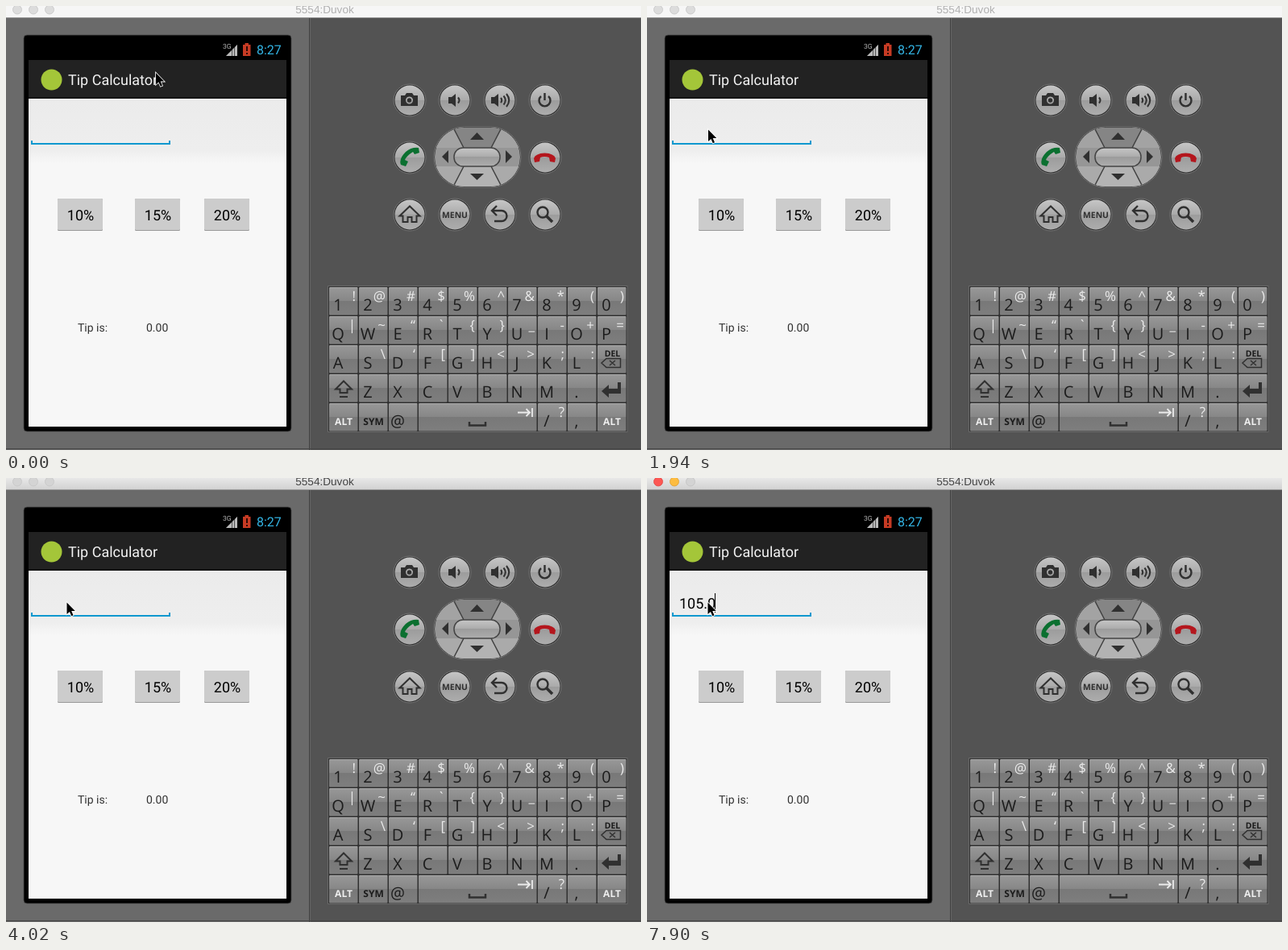
Recreate the animation shown at these times as an HTML page. Size 788 by 551 pixels, loop 8000 ms.

```html
<!DOCTYPE html>
<html lang="en">
<head>
<meta charset="utf-8">
<title>Tip Calculator</title>
<style>
  html, body { margin: 0; width: 100%; height: 100%; overflow: hidden; background: #535353; }
  svg { display: block; text-rendering: geometricPrecision; }
  text { white-space: pre; }
  .app { font-family: Roboto, sans-serif; font-size: 18px; }
  .key { font-family: "Open Sans", sans-serif; font-size: 20px; fill: #1c1c1c; text-anchor: middle; }
  .alt { font-size: 17px; fill: #ebebeb; text-anchor: end; }
  .cap { font-size: 12px; font-weight: 700; }
  .line { fill: none; stroke: #303030; stroke-width: 2.4; }
  .dark { fill: #303030; }
</style>
</head>
<body>
<svg width="788" height="551" viewBox="0 0 788 551">
  <defs>
    <linearGradient id="bar" x2="0" y2="1"><stop stop-color="#e8e8e8"/><stop offset="1" stop-color="#d2d2d2"/></linearGradient>
    <linearGradient id="page" x2="0" y2="1"><stop stop-color="#ebebeb"/><stop offset=".8" stop-color="#eeeeee"/><stop offset="1" stop-color="#f7f7f7"/></linearGradient>
    <linearGradient id="round" x2="0" y2="1"><stop stop-color="#c6c6c6"/><stop offset=".5" stop-color="#aaaaaa"/><stop offset=".5" stop-color="#9c9c9c"/><stop offset="1" stop-color="#adadad"/></linearGradient>
    <linearGradient id="cell" x2="0" y2="1"><stop stop-color="#989898"/><stop offset=".48" stop-color="#878787"/><stop offset=".48" stop-color="#787878"/><stop offset="1" stop-color="#7e7e7e"/></linearGradient>
    <clipPath id="padShape"><rect x="532" y="151" width="106" height="73" rx="36.5"/></clipPath>
  </defs>

  <!-- window -->
  <rect width="788" height="551" fill="#535353"/>
  <rect width="376" height="551" fill="#6a6a6a"/>
  <path d="M376.5 15V551" stroke="#3f3f3f"/>
  <path d="M377.5 15V551" stroke="#656565"/>
  <path d="M0 549.5H788" stroke="#454545"/>
  <rect id="titleBar" width="788" height="14"/>
  <path d="M0 14.5H788" stroke="#9b9b9b"/>
  <g id="lights"></g>
  <text id="title" x="395.5" y="9" text-anchor="middle" font-family="Liberation Sans, Arial, sans-serif" font-size="13.6">5554:Duvok</text>

  <!-- handset screen -->
  <rect x="22" y="36" width="332" height="492" rx="4" stroke="#4a4a4a" stroke-width=".8"/>
  <rect x="28" y="67" width="320" height="48" fill="#222"/>
  <path d="M28 114H348" stroke="#141414" stroke-width="2"/>
  <rect x="28" y="115" width="320" height="407" fill="#f7f7f7"/>
  <rect x="28" y="115" width="320" height="80" fill="url(#page)"/>
  <text class="app" x="269" y="53" fill="#b5b5b5" style="font-size:8.5px">3G</text>
  <path d="M273 62L287 48V62Z" fill="#555"/>
  <path d="M273 62L280 55V62ZM281 54L283 52V62H281ZM284 51L287 48V62H284Z" fill="#bbb"/>
  <path d="M296.500 46H301V48H303.500V62H294V48H296.500Z" fill="#c63b24"/>
  <path d="M298 50H300V56H298ZM298 58H300V60H298Z" fill="#300a06"/>
  <text class="app" x="311" y="60" fill="#33b5e5" style="font-size:16px">8:27</text>
  <circle cx="56.500" cy="91.500" r="13" fill="#a4c639"/>
  <text class="app" x="77" y="98" fill="#f3f3f3">Tip Calculator</text>
  <path d="M32 167V171H203V167" fill="none" stroke="#0f98cf" stroke-width="2"/>
  <g id="tips" class="app"></g>
  <text class="app" x="89" y="404" fill="#333" style="font-size:14px">Tip is:</text>
  <text class="app" x="174" y="404" fill="#333" style="font-size:14px">0.00</text>
  <text id="amount" class="app" x="40" y="162"></text>
  <rect id="caret" y="143" width="1" height="24"/>

  <!-- hardware buttons -->
  <g id="rounds"></g>
  <rect x="531" y="150" width="108" height="75" rx="37.500" fill="#2d2d2d" stroke="#777"/>
  <g clip-path="url(#padShape)">
    <rect x="532" y="151" width="106" height="73" fill="#969696"/>
    <path d="M532 151H638V176H532Z" fill="#a3a3a3"/>
    <path d="M532 199H638V224H532Z" fill="#aaa"/>
    <path d="M555 151H615L602 176H568Z" fill="#858585"/>
    <path d="M555 224H615L602 199H568Z" fill="#b3b3b3"/>
    <path d="M555 151L568 176M615 151L602 176M555 224L568 199M615 224L602 199" stroke="#404040" stroke-width="1.500"/>
  </g>
  <rect x="556" y="176" width="57" height="23" rx="11" fill="url(#round)" stroke="#444" stroke-width="1.500"/>
  <path class="dark" d="M576 166L584.500 157L593 166ZM576 208H593L584.500 216ZM549 179V195L541 187ZM620 179V195L628 187Z"/>
  <g id="icons">
    <path class="dark" fill-rule="evenodd" d="M490 111H495L497 108H504L506 111H511V124H490ZM500.500 112.500a4.500 4.500 0 1 0 .1 0Z"/>
    <circle class="dark" cx="500.500" cy="117" r="2.700"/>
    <path class="dark" d="M549 113H553L558 109V125L553 121H549ZM602 113H606L611 109V125L606 121H602Z"/>
    <path class="line" style="stroke-width:2" d="M561 113.500Q564 117 561 120.500M614 114Q616.500 117 614 120M617.500 111.500Q622 117 617.500 122.500M621 109Q627.500 117 621 125"/>
    <path class="line" d="M664 112A7 7 0 1 0 673 112M668.500 108V117"/>
    <path d="M490 197Q487 190 496 181Q503 175 512 176L513 182L507 184L505 181Q497 186 495 191L499 193L496 199Z" fill="#0b7030"/>
    <path d="M655 189Q657 183 668.500 182.500Q680 183 682 189L681 194L675 193L674 188Q668 186 663 188L662 193L656 194Z" fill="#b4161d"/>
    <path class="line" d="M488.500 260.500L501 248.500L513.500 260.500H509.500V268H503.500V262H498.500V268H492.500V260.500Z" style="stroke-width:2"/>
    <text class="key cap" x="557" y="263" style="font-size:10.400px;fill:#303030">MENU</text>
    <path class="line" d="M604 254H615A6 6 0 0 1 615 267H606M609 248L603 254L609 260"/>
    <circle class="line" cx="666" cy="256" r="6.500"/>
    <path class="line" style="stroke-width:3.500" d="M671 261L678 268"/>
  </g>

  <!-- keyboard -->
  <rect x="399.500" y="347.500" width="371.500" height="181" fill="#303030" stroke="#686868"/>
  <g id="keys"></g>
  <path class="line" style="stroke-width:2" d="M419 465.500L429 475.500H423.500V480H414.500V475.500H409ZM414 485H424"/>
  <path class="dark" d="M739 478L748 470V475H759V467H763V481H748V486Z"/>
  <path class="line" style="stroke-width:1.500" d="M739 443L745 437.500H762.500V448.500H745ZM749 440L756 446M756 440L749 446"/>
  <path class="line" style="stroke-width:2.500" d="M575 516V520.500H595V516"/>
  <path d="M635 504.500H650M645.500 500L650 504.500L645.500 509M653 499V510" fill="none" stroke="#ebebeb" stroke-width="1.800"/>

  <path id="pointer" d="M0 0V14.500L3.400 11.400L5.800 16.800L8 15.800L5.700 10.600H10.300Z" stroke="#fff" stroke-width="1.600" paint-order="stroke"/>
</svg>
<script>
const $ = id => document.getElementById(id);

$('lights').innerHTML = [14, 34, 54].map(x =>
  `<circle cx="${x}" cy="4.5" r="5.500" stroke-width=".8"/>`).join('');

$('tips').innerHTML = [[64, '10%'], [160, '15%'], [246, '20%']].map(([x, label]) =>
  `<rect x="${x}" y="239" width="56" height="40" rx="1.500" fill="#999"/>
   <rect x="${x}" y="239" width="56" height="39" rx="1.500" fill="#ccc"/>
   <text x="${x + 28.5}" y="266" text-anchor="middle">${label}</text>`).join('');

// The middle of the second row is taken by the direction pad.
let rounds = '';
for (const y of [117, 188, 259])
  for (const x of [501, 557, 613, 669])
    if (y !== 188 || x === 501 || x === 669)
      rounds += `<circle cx="${x}" cy="${y}" r="20" fill="#303030" stroke="#747474"/>
        <circle cx="${x}" cy="${y}" r="18.500" fill="url(#round)"/>`;
$('rounds').innerHTML = rounds;

// Each key is its main character followed by the alternate one.
const rows = [
  '1! 2@ 3# 4$ 5% 6^ 7& 8* 9( 0)',
  'Q| W~ E“ R` T{ Y} U_ I- O+ P=',
  'A S\\ D‘ F[ G] H< J> K; L: DEL',
  'SHIFT Z X C V B N M . ENTER',
  'ALT SYM @ SPACE /? , ALT'
];
const safe = s => s.replace(/&/g, '&amp;').replace(/</g, '&lt;');
let keys = '';
rows.forEach((row, r) => {
  let x = 401;
  const y = 349 + 36 * r;
  for (const k of row.split(' ')) {
    const w = k === 'SPACE' ? 147 : 36;
    keys += `<rect x="${x}" y="${y}" width="${w - .5}" height="34.500" rx="1" fill="url(#cell)"/>
      <path d="M${x + 1} ${y + .5}h${w - 2}" stroke="#aaa"/>`;
    if (k === 'ALT' || k === 'SYM')
      keys += `<text class="key cap" x="${x + 18}" y="${y + 27}" ${k === 'ALT' ? 'style="fill:#eee"' : ''}>${k}</text>`;
    else if (k === 'DEL')
      keys += `<text class="key cap" style="font-size:10.500px" x="${x + 18.5}" y="${y + 14}">DEL</text>`;
    else if (k.length < 3) {
      keys += `<text class="key" x="${x + 11}" y="${y + 29}">${safe(k[0])}</text>`;
      if (k[1]) keys += `<text class="key alt" x="${x + 33}" y="${y + 17}">${safe(k[1])}</text>`;
    }
    x += w + 1;
  }
});
$('keys').innerHTML = keys;

// Steps: [start in ms, values...]
const LOOP = 8000;
const pointer = [[0, 186, 83], [290, 109, 104], [440, 89, 115], [590, 77, 140.5],
  [740, 75.5, 152], [890, 76, 153.5], [3870, 74, 153.5], [4020, 75.5, 154.5]];
const blink = [[0, 0], [440, 1], [890, 0], [1490, 1], [1940, 0], [2540, 1], [2980, 0],
  [3430, 1], [4020, 0], [4470, 1], [5060, 0], [5360, 1]];
const typing = [[0, '', 40], [5360, '1', 49], [5660, '10', 59], [6560, '105', 69],
  [7460, '105.', 74], [7900, '105.0', 84]];
const at = (steps, t) => steps.findLast(s => s[0] <= t);

function draw(t) {
  const [, x, y] = at(pointer, t);
  $('pointer').setAttribute('transform', `translate(${x} ${y})`);

  const [, text, caretX] = at(typing, t);
  $('amount').textContent = text;
  $('caret').setAttribute('x', caretX);
  $('caret').setAttribute('opacity', at(blink, t)[1]);

  const active = t >= 4020;
  $('titleBar').setAttribute('fill', active ? 'url(#bar)' : '#f6f6f6');
  $('title').setAttribute('fill', active ? '#444' : '#b0b0b0');
  const colors = t >= 4170 ? ['#fc5753', '#fdbc40', '#d4d4d4'] : Array(3).fill(active ? '#d4d4d4' : '#dcdcdc');
  const rims = t >= 4170 ? ['#df4744', '#de9f34', '#c2c2c2'] : Array(3).fill('#c6c6c6');
  [...$('lights').children].forEach((c, i) => {
    c.setAttribute('fill', colors[i]);
    c.setAttribute('stroke', rims[i]);
  });
}

const start = performance.now();
function tick() {
  draw((performance.now() - start) % LOOP);
  requestAnimationFrame(tick);
}
tick();
</script>
</body>
</html>
```
